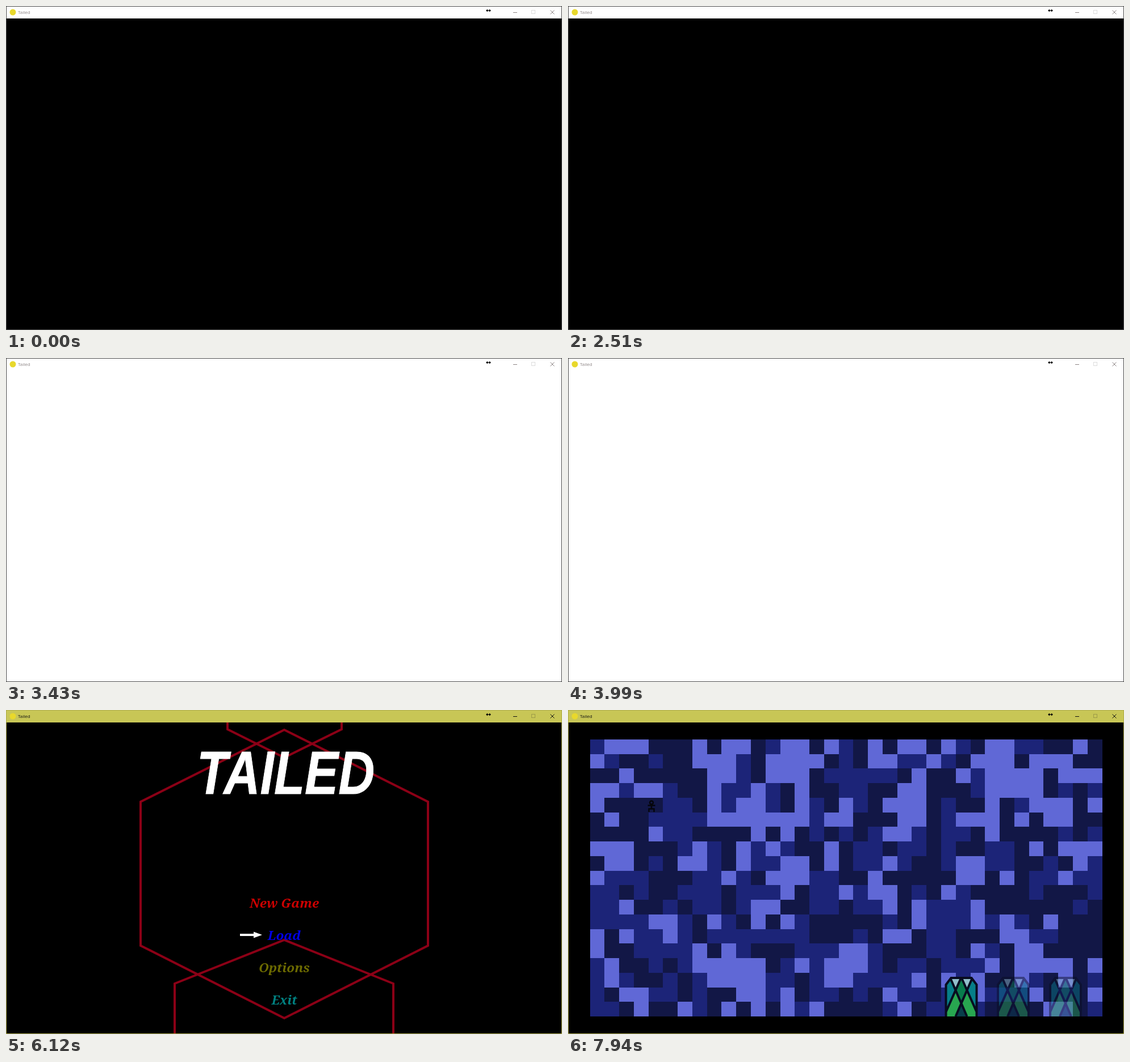
Recreate the animation shown at these times as an HTML page. Size 979 by 572 pixels, loop 7.99 s.

```html
<!DOCTYPE html>
<html lang="en">
<head>
<meta charset="utf-8">
<title>Tailed</title>
<style>
  html, body { margin: 0; width: 100%; height: 100%; overflow: hidden; background: #000; }
  svg { display: block; width: 979px; height: 572px; }
  #bar { --bar: #fff; --edge: #4a4a4a; --ink: #8c8484; --dim: #dcdcdc; }
  #bar.active { --bar: #c8c656; --edge: #aeac4c; --ink: #111; --dim: #9c9a48; }
  #bar text { font: 8px "Open Sans", sans-serif; fill: var(--ink); }
  #frame { fill: var(--bar); stroke: var(--edge); }
  .ink { fill: none; stroke: var(--ink); }
  .dim { fill: none; stroke: var(--dim); }
  #letters path { fill: none; stroke: #fff; stroke-width: 48; stroke-linecap: round; stroke-linejoin: round; }
  #letters .solid { fill: #fff; stroke: none; }
  .hex { fill: none; stroke: #8c0016; stroke-width: 4; }
  .logo { font: italic bold 108px "Liberation Sans", Arial, sans-serif; fill: #fff; stroke: #fff; text-anchor: middle; }
  .item { font: italic bold 22.5px "Noto Serif", Georgia, serif; text-anchor: middle; }
  [hidden] { display: none; }
</style>
</head>
<body>
<svg viewBox="0 0 979 572">
  <defs>
    <g id="pod">
      <path d="M-27 70V14L-18 2H18L27 14V70Z" fill="#067e88"/>
      <path d="M-18 2H18L10 24 0 1-10 24Z" fill="#92c0cc"/>
      <path d="M0 1 10 24 0 47-10 24Z" fill="#087c4c"/>
      <path d="M-27 62-10 24 0 47-10 70H-27ZM27 62 10 24 0 47 10 70H27Z" fill="#28a650"/>
      <path d="M0 47 10 70H-10Z" fill="#083e4a"/>
      <path d="M-27 70V14L-18 2H18L27 14V70M-19 3 10 70M19 3-10 70M0 1-27 62M0 1 27 62" fill="none" stroke="#080c20" stroke-width="4"/>
    </g>
  </defs>

  <g id="bar">
    <rect id="frame" x=".5" y=".5" width="978" height="571"/>
    <circle cx="12" cy="11" r="5.5" fill="#e8d82c"/>
    <text x="21" y="14">Tailed</text>
    <path d="M846 8H853" stroke="#000" stroke-width="1.4"/>
    <path d="M845 8 848 5.5V10.5ZM854 8 851 5.5V10.5Z"/>
    <path class="ink" d="M893 11.5H900M958.5 7.5 965.5 14.5M965.5 7.5 958.5 14.5"/>
    <rect class="dim" x="925.5" y="7.5" width="6" height="6"/>
  </g>
  <rect id="screen" x="1" y="22" width="977" height="549"/>

  <g id="letters">
    <path id="T" d="M397 131 552 129M475 131Q476 290 470 439"/>
    <path id="A" d="M385 458Q450 290 478 125Q510 290 571 458M425 345 535 342"/>
    <path id="I" class="solid" d="M485 129 510 124Q517 127 516 140Q512 200 498 229Q487 290 482 345Q476 390 478 425L483 446Q478 464 455 472Q438 472 433 447L430 428Q430 390 433 364L442 278 441 259 435 257Q431 240 446 184Q458 138 485 129Z"/>
    <path id="L" d="M436 132Q425 300 424 436L531 441"/>
    <path id="E" d="M552 129 404 136Q395 300 400 438L550 436M402 285 515 280"/>
    <path id="D" d="M415 136Q420 300 411 457Q584 450 584 300Q584 150 415 136"/>
  </g>

  <g id="menu">
    <path class="hex" d="M490 35 743 162V416L490 544 237 416V162ZM390 22V34L490 84 591 34V22M297 571V483L490 406 682 483V571"/>
    <text class="logo" transform="translate(492.5 147.500) scale(.82 1)">TAILED</text>
    <text class="item" x="490" y="349" fill="#cc0000">New Game</text>
    <text class="item" x="490" y="406" fill="#0000e6">Load</text>
    <text class="item" x="490" y="463" fill="#6c6a00">Options</text>
    <text class="item" x="490" y="520" fill="#008080">Exit</text>
    <path id="arrow" d="M0-2H24V-5.5L39 0 24 5.5V2H0Z" fill="#fff"/>
  </g>

  <g id="map">
    <g id="tiles" shape-rendering="crispEdges"></g>
    <g fill="none" stroke="#05060c" stroke-width="2.5">
      <circle cx="147" cy="163.500" r="3"/>
      <path d="M147 167V174M140.500 168.500H153.500M142.500 180V174.500H151.500V180"/>
    </g>
    <use href="#pod" x="692.500" y="471"/>
    <use href="#pod" x="784" y="471" opacity=".45"/>
    <use href="#pod" x="876" y="471" opacity=".45"/>
  </g>
</svg>

<script>
const LOOP = 7990, FOCUS = 5240;
const $ = id => document.getElementById(id);

// Dungeon floor: seeded shades, some repeated from the tile to the left or above.
const COLS = 35, ROWS = 19, CELL_W = 902 / COLS, CELL_H = 489 / ROWS;
const SHADES = ["#121746", "#1c2478", "#6068d6"];
let seed = 41;
const random = () => (seed = (seed * 16807) % 2147483647) / 2147483647;

const floor = [];
for (let i = 0; i < COLS * ROWS; i++) {
  const pick = random();
  const fresh = SHADES[Math.floor(random() * SHADES.length)];
  floor[i] = (pick < 0.12 && floor[i - 1]) || (pick > 0.88 && floor[i - COLS]) || fresh;
  const tile = document.createElementNS("http://www.w3.org/2000/svg", "rect");
  const box = {
    x: 38.5 + (i % COLS) * CELL_W, y: 52 + Math.floor(i / COLS) * CELL_H,
    width: CELL_W, height: CELL_H, fill: floor[i]
  };
  for (const key in box) tile.setAttribute(key, box[key]);
  $("tiles").append(tile);
}

const SCENES = [
  [0, "black"], [330, "T"], [660, "A"], [970, "I"], [1300, "L"], [1580, "E"], [1910, "D"],
  [2510, "black"], [2840, "white"], [3120, "black"], [3430, "white"], [3710, "black"],
  [3990, "white"], [4320, "black"], [4680, "menu"], [7890, "map"]
];
const CHOICES = [[0, 0], [6120, 1], [6490, 2], [6920, 1], [7380, 0]];
const ARROW_X = [381, 412, 397];
const at = (list, t) => list.findLast(step => step[0] <= t)[1];

const start = performance.now();
function draw() {
  const t = (performance.now() - start) % LOOP;
  const scene = at(SCENES, t);
  const choice = at(CHOICES, t);
  for (const id of [..."TAILED", "menu", "map"]) $(id).toggleAttribute("hidden", id !== scene);
  $("screen").setAttribute("fill", scene === "white" ? "#fff" : "#000");
  $("bar").classList.toggle("active", t >= FOCUS);
  $("arrow").setAttribute("transform", `translate(${ARROW_X[choice]} ${340 + choice * 57})`);
  requestAnimationFrame(draw);
}
draw();
</script>
</body>
</html>
```
